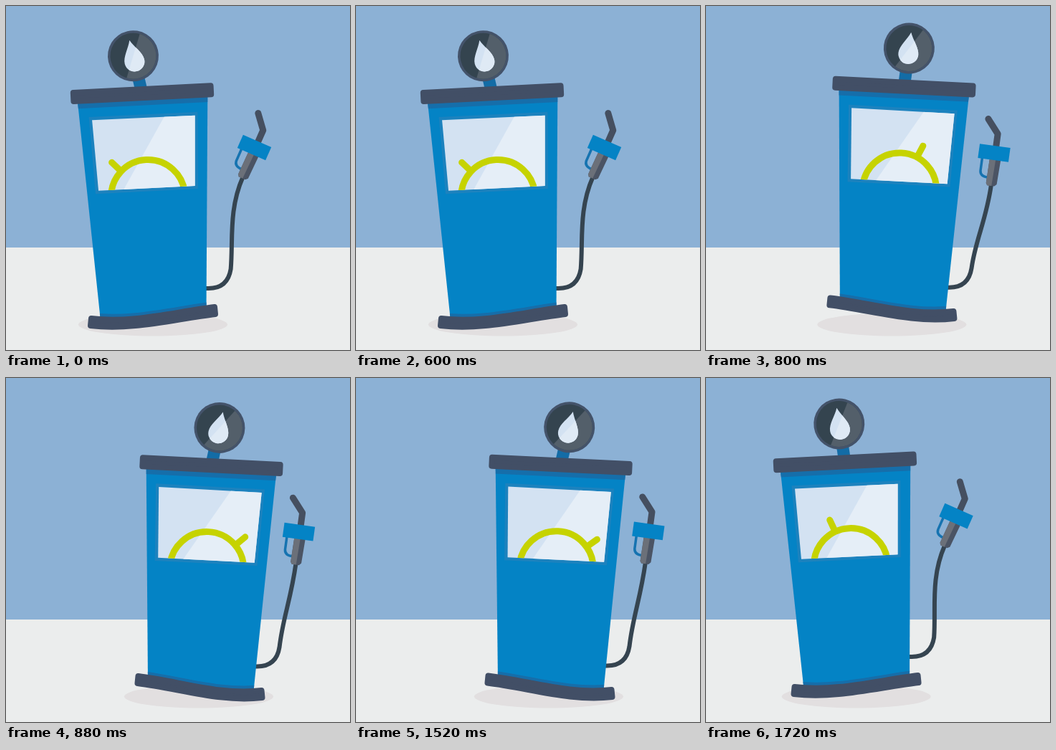
Write an HTML page with a canvas that moves like this. It is 480 by 480 pixels and loops after 1.76 s.

```html
<!DOCTYPE html>
<html lang="en">
<head>
<meta charset="utf-8">
<title>Hopping fuel pump</title>
<style>
  html, body { margin: 0; width: 100%; height: 100%; overflow: hidden; background: #8cb1d5; }
  canvas { display: block; width: 100vw; height: 100vh; }
</style>
</head>
<body>
<canvas id="stage"></canvas>
<script>
const LOOP = 1760, STEP = 40, SIZE = 480, HORIZON = 337;
const HOP_RIGHT = 604, HOP_LEFT = 1504, HOP = 248, AIRTIME = 257, HEIGHT = 21;
const BLUE = '#0483c5', DEEP = '#166eaa', SLATE = '#424f66', LIME = '#c6d300';
const SKY = '#8cb1d5', PALE = '#d3e2f2', PALER = '#e5eef7';

const canvas = document.getElementById('stage');
const ratio = window.devicePixelRatio || 1;
canvas.width = canvas.height = SIZE * ratio;
const ctx = canvas.getContext('2d');

const rad = deg => deg * Math.PI / 180;
const mix = (a, b, u) => a + (b - a) * u;
const clamp = u => Math.min(1, Math.max(0, u));
const ease = u => (1 - Math.cos(Math.PI * u)) / 2;

// 0 = standing left, 1 = standing right; each part has its own delay and pace
function side(t, delay, duration, power = 1) {
  const hop = start => ease(clamp((t - start - delay) / duration) ** power);
  return hop(HOP_RIGHT) - hop(HOP_LEFT);
}

function lift(t) {
  const arc = start => Math.sin(Math.PI * clamp((t - start) / AIRTIME)) ** 2;
  return HEIGHT * (arc(HOP_RIGHT) + arc(HOP_LEFT));
}

function frame(x, y, deg) {
  const c = Math.cos(rad(deg)), s = Math.sin(rad(deg));
  return {
    at: (px, py) => [x + px * c - py * s, y + px * s + py * c],
    draw(paint) {
      ctx.save();
      ctx.translate(x, y);
      ctx.rotate(rad(deg));
      paint();
      ctx.restore();
    }
  };
}

function fill(color) {
  ctx.fillStyle = color;
  ctx.fill();
}

function stroke(color, width, cap = 'round') {
  ctx.strokeStyle = color;
  ctx.lineWidth = width;
  ctx.lineCap = cap;
  ctx.lineJoin = 'round';
  ctx.stroke();
}

function line(...points) {
  ctx.beginPath();
  points.forEach(p => ctx.lineTo(...p));
}

function polygon(color, ...points) {
  line(...points);
  ctx.closePath();
  fill(color);
}

function disc(x, y, rx, ry, color) {
  ctx.beginPath();
  ctx.ellipse(x, y, rx, ry, 0, 0, 2 * Math.PI);
  fill(color);
}

function drawHead() {
  // Lights the lower right half of the current path
  const shine = color => {
    ctx.save();
    ctx.clip();
    ctx.rotate(rad(30));
    ctx.fillStyle = color;
    ctx.fillRect(0, -40, 40, 80);
    ctx.restore();
  };
  ctx.fillStyle = '#136ca6';
  ctx.fillRect(-8.5, -22, 17, 22);
  ctx.translate(0, -54);
  disc(0, 0, 35.5, 35.5, '#44536a');
  disc(0, 0, 32, 32, '#34444f');
  shine('#535f6a');
  ctx.beginPath();
  ctx.moveTo(0, -22.5);
  ctx.bezierCurveTo(4, -12, 14, -2, 14, 8);
  ctx.arc(0, 8, 14, 0, Math.PI);
  ctx.bezierCurveTo(-14, -2, -4, -12, 0, -22.5);
  fill(PALE);
  shine('#dfeaf5');
}

function drawWindow(needle) {
  polygon('#1c82be', [-76, 29], [76, 29.5], [71, 136.5], [-72, 136.5]);
  polygon(PALE, [-71.7, 33.5], [72, 34.2], [67, 132.4], [-67.7, 132.2]);
  ctx.save();
  ctx.clip();
  polygon(PALER, [29.5, 33], [80, 33], [80, 134], [-33.5, 134]);
  ctx.translate(0.9, 144);
  ctx.beginPath();
  ctx.arc(0, 0, 51.5, Math.PI, 0);
  stroke(LIME, 9);
  ctx.rotate(rad(needle));
  line([0, -52], [0, -69.5]);
  stroke(LIME, 9);
  ctx.restore();
}

function drawNozzle() {
  ctx.beginPath();
  ctx.moveTo(-15.5, 8);
  ctx.lineTo(-15.5, 27);
  ctx.quadraticCurveTo(-15, 35, -4, 35);
  stroke('#1673b0', 3.5);
  line([-14.5, -46], [1.5, -27], [1.5, -5]);
  stroke('#454f60', 9);
  polygon('#4b5464', [-5, 8], [10.5, 8], [9.5, 43], [6.5, 46], [-3.5, 46], [-5.5, 43]);
  polygon('#6b7079', [-5, 8], [3.5, 8], [2.5, 46], [-3.5, 46], [-5.5, 43]);
  ctx.fillStyle = BLUE;
  ctx.fillRect(-21.5, -10, 43, 20);
}

function drawBase(x, y0, y3, color) {
  const sag = 7;
  const edge = (from, to, a, b, dy) => {
    ctx.lineTo(x + from, a + dy);
    ctx.bezierCurveTo(x + mix(from, to, 1 / 3), a + sag + dy,
                      x + mix(from, to, 2 / 3), b + sag + dy, x + to, b + dy);
  };
  ctx.beginPath();
  edge(4.5, 176.5, y0, y3, -5);
  edge(177.5, 3.5, y3, y0, 5);
  ctx.closePath();
  fill(color);
  stroke(color, 8);
}

function drawHose(x, y, nozzle) {
  const bend = [x + 34, y - 27];
  const grip = nozzle.at(2, 44), pull = nozzle.at(2, 94);
  ctx.beginPath();
  ctx.moveTo(x - 4, y);
  ctx.lineTo(x + 3, y);
  ctx.bezierCurveTo(x + 20, y, x + 31, y - 8, ...bend);
  ctx.bezierCurveTo(mix(bend[0], grip[0], 0.2), bend[1] - 40, ...pull, ...grip);
  stroke('#354450', 6, 'butt');
}

function draw(t) {
  const up = lift(t);
  const pos = side(t, 0, HOP);        // cap and nozzle
  const lean = side(t, 0, 150);       // the top tips first
  const roll = side(t, 0, 225);       // slope of the foot
  const drag = side(t, 50, 200);      // the foot follows late
  const sway = side(t, 0, 345, 0.8);  // lamp and needle trail behind
  const flick = side(t, 90, 100);     // nozzle turns in mid-air

  const capX = mix(190, 286.5, pos), capY = 122.2 - up, tilt = mix(-2.9, 2.9, lean);
  const cap = frame(capX, capY, tilt);
  const lamp = frame(capX, capY, tilt + mix(-10.5, 10.7, sway));
  const nozzle = frame(mix(346.5, 408.5, pos), mix(197.5, 214.7, lean) - up,
                       mix(23.8, 7.8, flick));
  const baseX = mix(114.5, 180, drag), baseY = mix(433, 431, drag) - up;
  const slope = mix(-8, 10, roll);
  const y0 = baseY - slope, y3 = baseY + slope;
  const footX = baseX + 165, shoulder = cap.at(91, 8);

  ctx.setTransform(ratio, 0, 0, ratio, 0, 0);
  ctx.fillStyle = SKY;
  ctx.fillRect(0, 0, SIZE, HORIZON);
  ctx.fillStyle = '#ebeded';
  ctx.fillRect(0, HORIZON, SIZE, SIZE - HORIZON);
  disc(mix(205, 269, side(t, 11, HOP)), 444.5, 104, 16, '#e2dfe0');

  drawHose(mix(footX, shoulder[0], 0.08), y3 - mix(31, 38.5, roll), nozzle);
  nozzle.draw(drawNozzle);
  lamp.draw(drawHead);

  polygon(BLUE, cap.at(-90.5, 8), shoulder, [footX, y3], [baseX + 18, y0 + 3]);
  ctx.save();
  ctx.clip();
  drawBase(baseX, y0 - 4, y3 - 4, DEEP);
  cap.draw(() => {
    ctx.fillStyle = DEEP;
    ctx.fillRect(-100, 0, 200, 16.5);
  });
  ctx.restore();
  drawBase(baseX, y0, y3, SLATE);

  cap.draw(() => {
    drawWindow(mix(-43.8, 53.9, sway));
    polygon(SLATE, [-96, -6], [96, -6], [96, 6], [-96, 6]);
    stroke(SLATE, 8);
  });
}

const start = performance.now();
function tick() {
  const t = (performance.now() - start) % LOOP;
  draw(Math.floor(t / STEP) * STEP);
  requestAnimationFrame(tick);
}
tick();
</script>
</body>
</html>
```
